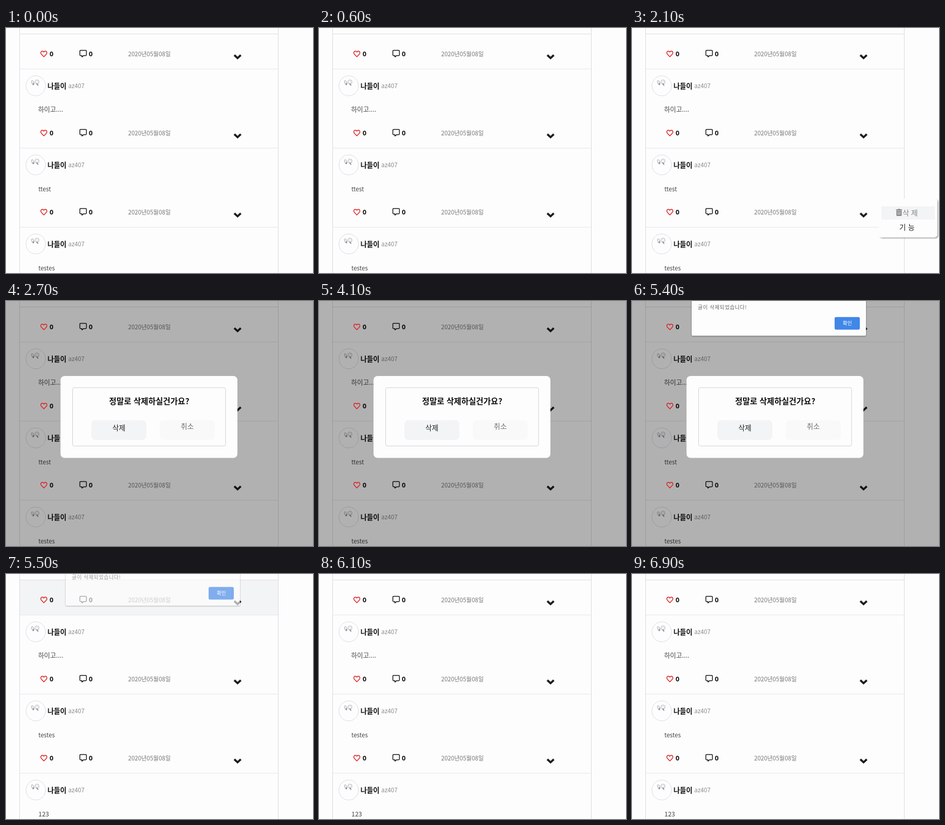
These frames come from a looping animation (597x477 px, 7800 ms). An HTML page:

```html
<!DOCTYPE html>
<html lang="ko">
<head>
<meta charset="utf-8">
<title>글 삭제</title>
<style>
html, body { margin: 0; width: 100%; height: 100%; overflow: hidden; background: #fefdfe; }
svg { display: block; width: 597px; height: 477px; }
text { font-family: "Noto Sans CJK KR", "Noto Sans CJK JP", "Noto Sans CJK", sans-serif; fill: #444; }
.mid { text-anchor: middle; }
.bold { font-weight: 700; fill: #111; }
.dark { fill: #222; }
.count { font: 600 13px "Noto Sans", "Open Sans", sans-serif; fill: #111; }
.date { font-size: 11.5px; fill: #777; }
.name { font-size: 13.4px; }
.id { font-size: 11.8px; fill: #8c8c8c; }
.latin { font-size: 11.6px; }
.line { fill: none; stroke: #e1e5e8; }
.edge { fill: none; stroke: #d9dade; }
.tint { fill: #f2f4f5; }

.anim { animation: 7800ms step-end infinite; }
.before { animation-name: before; }
.after { animation-name: after; }
.menu { animation-name: menu; }
.item { animation-name: item; }
.item-label { animation-name: item-label; }
.modal { animation-name: modal; }
.press { animation-name: press; }
.alert { animation-name: alert; }
.row-hover { animation-name: row-hover; }

@keyframes before { 0% { visibility: visible } 70.51%, 100% { visibility: hidden } }
@keyframes after { 0% { visibility: hidden } 70.51%, 100% { visibility: visible } }
@keyframes menu { 0%, 34.61%, 100% { visibility: hidden } 21.79% { visibility: visible } }
@keyframes item { 0%, 34.61%, 100% { opacity: 0 } 23.07% { opacity: 1 } }
@keyframes item-label { 0%, 34.61%, 100% { fill: #222 } 23.07% { fill: #858585 } }
@keyframes modal { 0%, 70.51%, 100% { visibility: hidden } 34.61% { visibility: visible } }
@keyframes press { 0%, 52.56%, 100% { opacity: 1 } 44.87% { opacity: .65 } }
@keyframes row-hover { 0%, 71.79%, 100% { visibility: hidden } 70.51% { visibility: visible } }
@keyframes alert {
  0%, 71.79%, 100% { opacity: 0; transform: translateY(-12px) }
  53.84% { opacity: .25; transform: translateY(-9px) }
  55.12% { opacity: .6; transform: translateY(-5px) }
  56.41% { opacity: .9; transform: translateY(-1px) }
  57.69% { opacity: 1; transform: none }
  70.51% { opacity: .65; transform: translateY(-6px) }
}
</style>
</head>
<body>
<svg viewBox="0 0 597 477">
  <defs>
    <filter id="soft" x="-10%" y="-20%" width="120%" height="150%">
      <feDropShadow dx="0" dy="1" stdDeviation="1.3" flood-color="#000" flood-opacity=".5"/>
    </filter>
    <filter id="cast" x="-10%" y="-10%" width="120%" height="130%">
      <feDropShadow dx="2" dy="2" stdDeviation="1" flood-color="#000" flood-opacity=".35"/>
    </filter>

    <path id="heart" d="M73.6 56 L68.6 50.8 C66.5 48.4 68 45 70.7 45 C72.2 45 73 45.9 73.6 46.9 C74.2 45.9 75 45 76.5 45 C79.2 45 80.7 48.4 78.6 50.8 Z"
      fill="none" stroke="#dc2020" stroke-width="1.5" stroke-linejoin="round"/>

    <g id="actions">
      <text class="count" x="84.7" y="55">0</text>
      <path d="M145 43.6 H155 Q156.4 43.6 156.4 45 V52.3 Q156.4 53.7 155 53.7 H151 L147.6 56.3 V53.7 H145 Q143.6 53.7 143.6 52.3 V45 Q143.6 43.6 145 43.6 Z"
        fill="none" stroke="#151515" stroke-width="1.5" stroke-linejoin="round"/>
      <text class="count" x="161" y="55">0</text>
      <text class="date" x="237.5" y="55.3">2020년05월08일</text>
      <path d="M444 52.8 L450.3 58.6 L456.6 52.8" fill="none" stroke="#1d1d1f" stroke-width="3.9"/>
      <path class="line" d="M27 79.9 H529"/>
    </g>

    <g id="author">
      <ellipse class="edge" cx="57.8" cy="112.5" rx="19" ry="19.5"/>
      <g fill="#eef2f5" stroke="#a5a5a8" stroke-width=".8">
        <ellipse cx="52" cy="106.5" rx="2.2" ry="4.6" transform="rotate(-22 52 106.5)"/>
        <circle cx="60.3" cy="105" r="4"/>
      </g>
      <path d="M53 107 V111 M59.5 108 L62.5 112" stroke="#6f6f72" stroke-width="1.3"/>
      <text class="name bold" x="80.7" y="118">나들이</text>
      <text class="id" x="121" y="117.4">az407</text>
    </g>
  </defs>

  <rect width="597" height="477" fill="#fefdfe"/>
  <rect class="tint anim row-hover" x="27" y="12" width="502" height="68"/>
  <path class="edge" d="M26.5 0 V477 M529.5 0 V477 M26 11.7 H530"/>

  <use href="#actions"/>
  <use href="#actions" y="154"/>
  <use href="#actions" y="308"/>
  <use href="#author"/>
  <use href="#author" y="154"/>
  <use href="#author" y="308"/>

  <text x="62.5" y="163" font-size="12.6">하이고....</text>
  <g class="latin anim before">
    <text x="63" y="317.5">ttest</text>
    <text x="63" y="471.5">testes</text>
  </g>
  <g class="latin anim after">
    <text x="63" y="317.5">testes</text>
    <text x="63" y="471.5" font-size="12.4">123</text>
  </g>

  <g class="anim menu" font-size="14">
    <rect x="480" y="332" width="113.5" height="75.5" rx="5" fill="#fefdfe" filter="url(#cast)"/>
    <rect class="tint anim item" x="485" y="347" width="104" height="26"/>
    <g class="anim item-label">
      <path d="M513.3 353 H517 L517.8 352 H521 L521.8 353 H525.3 V354.7 H513.3 Z M514.2 355.6 H524.4 V364.6 Q524.4 366 523 366 H515.6 Q514.2 366 514.2 364.6 Z"/>
      <path d="M516.9 357.3 V364 M519.3 357.3 V364 M521.7 357.3 V364" stroke="#f2f4f5" stroke-width=".8"/>
      <text x="526" y="365" style="fill: inherit">삭 제</text>
    </g>
    <text class="mid dark" x="534.7" y="393">기 능</text>
  </g>

  <g class="anim modal">
    <rect width="597" height="477" opacity=".3"/>
    <rect x="106" y="146" width="344" height="159.5" rx="8" fill="#fefdfe"/>
    <rect x="129.5" y="168.8" width="297.5" height="113.5" rx="3" fill="none" stroke="#cfcfd3"/>
    <text class="mid bold" x="278.5" y="201.3" font-size="15.6">정말로 삭제하실건가요?</text>
    <g class="anim press">
      <rect class="tint" x="166" y="232" width="107" height="38.5" rx="8"/>
      <text class="mid dark" x="219.5" y="252.2" font-size="13.8">삭제</text>
    </g>
    <rect x="299" y="232" width="107" height="38.5" rx="8" fill="#f9f9fa"/>
    <text x="352.5" y="249.2" class="mid" font-size="13.8" style="fill: #707070">취소</text>
  </g>

  <use href="#heart"/>
  <use href="#heart" y="154"/>
  <use href="#heart" y="308"/>

  <g class="anim alert">
    <rect x="116" y="-60" width="339" height="127.5" rx="2" fill="#fefdfe" filter="url(#soft)"/>
    <text x="128" y="16.4" font-size="10" letter-spacing=".6" style="fill: #666">글이 삭제되었습니다!</text>
    <rect x="394" y="31.3" width="49" height="24.4" rx="3" fill="#4087e8"/>
    <text class="mid" x="418.8" y="47" font-size="9.8" style="fill: #fff">확인</text>
  </g>
</svg>
</body>
</html>
```
